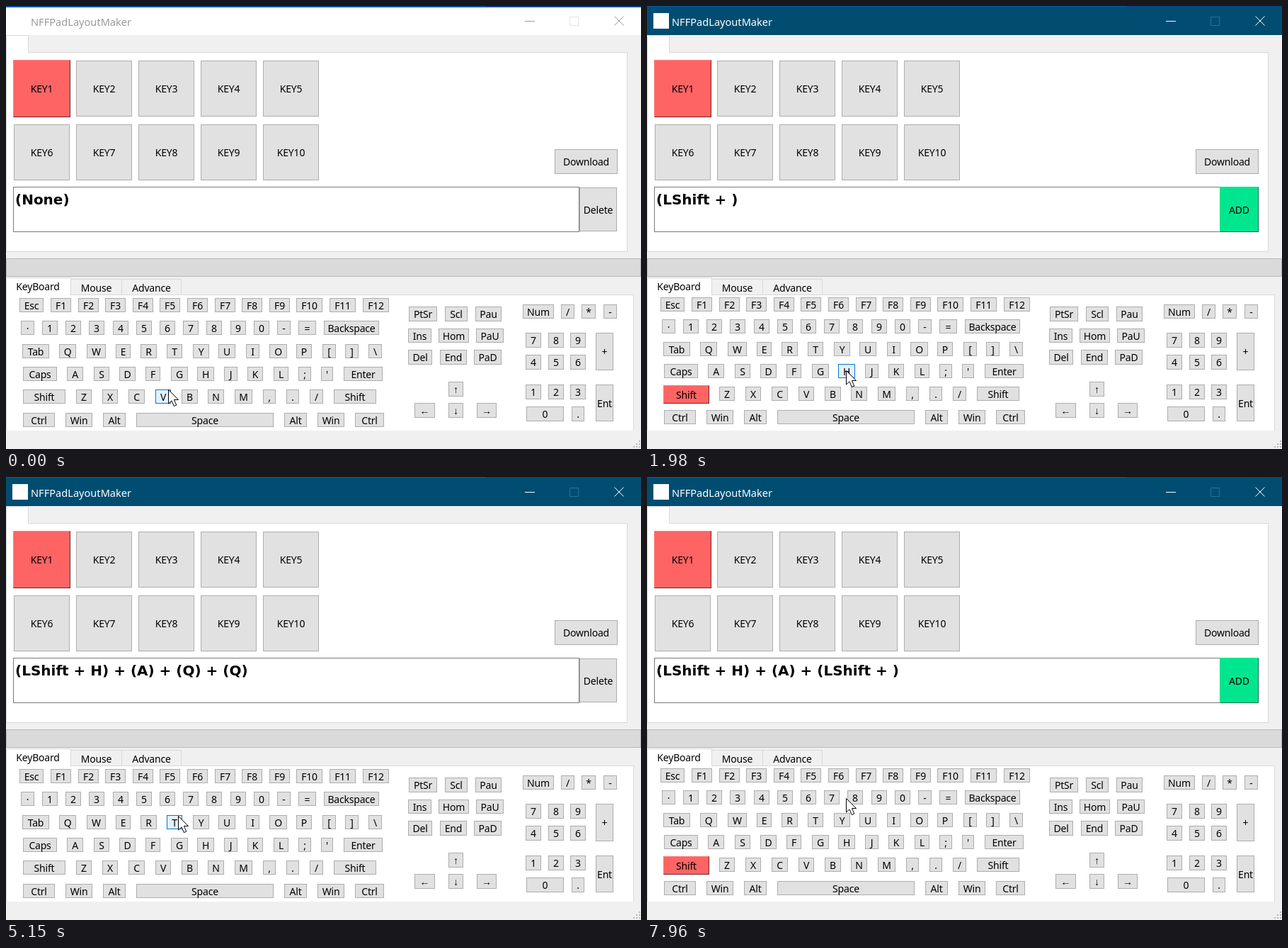
An HTML page for the animation above (8 s loop, 897 by 625 pixels).

```html
<!DOCTYPE html>
<html lang="en">
<head>
<meta charset="utf-8">
<title>NFFPadLayoutMaker</title>
<style>
html, body { margin: 0; width: 100%; height: 100%; overflow: hidden; background: #f0f0f0; }
#stage { position: absolute; left: 0; top: 0; width: 897px; height: 625px; overflow: hidden; background: #f0f0f0;
  font: 14px "Noto Sans", "Open Sans", sans-serif; letter-spacing: -.2px; color: #000; }
#stage div { position: absolute; box-sizing: border-box; white-space: pre; }
#stage svg { position: absolute; overflow: visible; }
#bar { left: 0; top: 1px; width: 897px; height: 40px; background: #fff; border-top: 1px solid #0b5ca5; color: #999; --off: #e2e2e2; }
#bar.active { background: #014d71; border-color: #014d71; color: #fff; --off: #2b7191; }
#name { left: 35px; top: 0; line-height: 40px; font-size: 14.6px; letter-spacing: 0; }
#bar svg { left: 0; top: -2px; fill: none; stroke: currentColor; }
.pane { background: #fff; border: 1px solid #d9d9d9; }
.tab { background: #f0f0f0; border: 1px solid #d9d9d9; border-bottom: 0; text-align: center; line-height: 23px; }
.tab.open { background: #fff; }
.key { display: flex; align-items: center; justify-content: center; background: #e1e1e1; border: 1px solid #adadad; }
.key.hover { background: #e5f1fb; border-color: #0078d7; }
.key.press { background: #cce4f7; border-color: #005499; }
.key.hot { background: #ff6464; border-color: #ff7c7c #702424 #702424 #ff7c7c; }
.key.add { background: #00e68f; border-color: #00e68f #00704a #00704a #00e68f; }
#combo { left: 10px; top: 255px; width: 800px; height: 64px; background: #fff; border: 1px solid #7a7a7a;
  font: bold 20px/34px "DejaVu Sans", sans-serif; letter-spacing: 0; padding-left: 2px; }
</style>
</head>
<body>
<div id="stage"></div>
<script>
const LOOP = 8000;
const stage = document.getElementById('stage');

function box(x, y, w, h, cls = '', text = '', parent = stage) {
  const el = document.createElement('div');
  el.className = cls;
  el.textContent = text;
  parent.append(el);
  place(el, x, y, w, h);
  return el;
}

function place(el, x, y, w, h) {
  Object.assign(el.style, { left: x + 'px', top: y + 'px', width: w + 'px', height: h + 'px' });
}

function fill(x, y, w, h, color) {
  box(x, y, w, h).style.background = color;
}

// Title bar
fill(0, 0, 678, 1, '#0b5ca5');
fill(678, 0, 219, 1, '#0a4387');
const bar = box(0, 1, 897, 40);
bar.id = 'bar';
bar.innerHTML = `<div id="name">NFFPadLayoutMaker</div>
  <svg width="897" height="41"><path d="M9 10h22v22h-22z" fill="#fff" stroke="none"/>
  <path d="M733 21.5h14M859.5 14.5l13 13m0-13l-13 13"/>
  <path d="M796.5 15.5h12v12h-12z" stroke="var(--off)"/></svg>`;

// Upper panel
box(0, 65, 878, 282, 'pane');
box(0, 41, 32, 25, 'tab open');
fill(1, 60, 30, 8, '#fff');
for (let i = 0; i < 10; i++) {
  const x = 11 + i % 5 * 88, y = i < 5 ? 77 : 167;
  if (i) box(x, y, 79, 79, 'key', 'KEY' + (i + 1));
  else box(x - 1, y - 1, 81, 81, 'key hot', 'KEY1');
}
const combo = box(10, 255, 800, 64);
combo.id = 'combo';
const splitter = box(0, 356, 897, 26);
splitter.style.cssText += 'background:#d9dad9;border:1px solid #b9b9b9';

// Lower panel
box(0, 407, 887, 192, 'pane').style.borderBottom = 0;
box(91, 385, 73, 23, 'tab', 'Mouse').style.borderBottom = '1px solid #d9d9d9';
box(163, 385, 85, 23, 'tab', 'Advance').style.borderBottom = '1px solid #d9d9d9';
box(0, 383, 92, 25, 'tab open', 'KeyBoard').style.paddingRight = '2px';

// Resize grip
for (let r = 0; r < 3; r++)
  for (let c = 0; c <= r; c++) fill(894 - c * 4, 613 + r * 4, 2, 2, '#b8b8b8');

// Buttons that react to the pointer
const keys = [];
function addKey(label, x, y, w, h) {
  const key = { label, x, y, w, h, el: box(x, y, w, h, 'key', label) };
  keys.push(key);
  return key;
}
addKey('Download', 775, 202, 89, 35);
const action = addKey('Delete', 810, 256, 53, 62);

// Main block: each row has a start, a gap, and "label width" pairs
const letters = [
  [19, 10, 'Esc 34 F1 28.6 F2 28.6 F3 28.6 F4 28.6 F5 28.6 F6 28.6 F7 28.6 F8 28.6 F9 28.6 F10 36.6 F11 36.6 F12 37'],
  [21, 11.2, '· 18.8 1 22 2 22 3 22 4 22 5 22 6 22 7 22 8 22 9 22 0 22 - 19 = 24.5 Backspace 78'],
  [23, 14.3, 'Tab 38 Q 24 W 27 E 21.3 R 22.5 T 22 Y 22.5 U 24 I 18.5 O 24.5 P 22 [ 18.5 ] 18.5 \\ 19'],
  [24, 14.3, 'Caps 48 A 23 S 22 D 23 F 21 G 23.5 H 23.5 J 19 K 22 L 21 ; 18 \' 17 Enter 55'],
  [24, 15, 'Shift 60 Z 22 X 22 C 22.5 V 22 B 22.5 N 23 M 25 , 18 . 18 / 19 Shift 60'],
  [24, 15, 'Ctrl 45 Win 38 Alt 32 Space 194 Alt 32 Win 38 Ctrl 41']
].map(([start, gap, spec]) => {
  const parts = spec.split(' '), row = [];
  for (let i = 0, x = start; i < parts.length; i += 2) {
    const w = +parts[i + 1];
    row.push(addKey(parts[i], Math.round(x), 0, Math.round(w), 20));
    x += w + gap;
  }
  return row;
});
const leftShift = letters[4][0];
const homeX = letters[4].map(k => k.x);

// Side blocks: "label x width" triples on one line
function line(y, h, spec) {
  const parts = spec.split(' ');
  for (let i = 0; i < parts.length; i += 3) addKey(parts[i], +parts[i + 1], y, +parts[i + 2], h);
}
line(424, 21, 'PtSr 569 40 Scl 620 32 Pau 663 37');
line(455, 20, 'Ins 568 33 Hom 611 43 PaU 664 39');
line(485, 21, 'Del 568 34 End 613 38 PaD 661 39');
line(530, 21, '↑ 625 21');
line(560, 21, '← 577 29 ↓ 625 21 → 665 28');
line(421, 20, 'Num 730 44 / 784 19 * 813 20 - 844 19');
line(461, 21, '7 734 22 8 766 22 9 797 22');
line(492, 21, '4 734 22 5 766 22 6 797 22');
line(534, 21, '1 734 22 2 766 22 3 797 22');
line(565, 21, '0 735 53 . 799 18');
line(461, 53, '+ 833 25');
line(534, 52, 'Ent 833 25');

// Pointer
stage.insertAdjacentHTML('beforeend', `<svg id="pointer" width="18" height="26" style="left:0;top:0">
  <path d="M.5 .5V20L5 15.9 8.3 23.6 11.8 22.1 8.5 14.5H14.6Z" fill="#fff" stroke="#000"/></svg>`);
const pointer = document.getElementById('pointer');

// Screen updates: first time, last time, count
const ticks = [0];
for (const [from, to, n] of [[70, 810, 8], [940, 1740, 8], [1860, 2580, 7], [2690, 3390, 7], [3500, 4210, 7],
  [4340, 5030, 7], [5150, 5840, 7], [5970, 6550, 6], [6690, 6690, 1], [6830, 6830, 1], [6890, 7580, 7], [7710, 7960, 3]])
  for (let i = 0; i < n; i++) ticks.push(Math.floor(from + (to - from) * i / Math.max(1, n - 1) / 10 + .01) && Math.round((from + (to - from) * i / Math.max(1, n - 1)) / 10) * 10);

// Pointer path: time, x, y
const path = [
  [0, 229, 541], [70, 222, 541], [600, 76, 541], [810, 68, 541], [940, 74, 540],
  [1740, 268, 514], [1860, 278, 513], [1980, 281, 514], [2100, 281, 514], [2580, 104, 514],
  [2690, 100, 514], [2920, 100, 514], [3160, 170, 494], [3390, 223, 490], [3700, 270, 488],
  [3960, 190, 535], [4210, 97, 502], [4340, 63, 503], [4450, 86, 491], [4800, 88, 488],
  [5030, 107, 484], [5150, 243, 478], [5380, 590, 368], [5610, 815, 294], [5840, 840, 288],
  [6550, 840, 288], [6690, 824, 284], [6830, 690, 316], [6890, 545, 355], [7120, 250, 480],
  [7350, 60, 548], [7470, 30, 555], [7580, 21, 553], [7710, 35, 551], [7840, 150, 512], [7960, 281, 453]
];

const typed = [
  [0, '(None)'], [700, '(LShift + )'], [2100, '(LShift + H)'], [2800, '(LShift + H) + (A)'],
  [4560, '(LShift + H) + (A) + (Q)'], [4800, '(LShift + H) + (A) + (Q) + (Q)'],
  [6080, '(LShift + H) + (A) + (Q)'], [6430, '(LShift + H) + (A)'], [7710, '(LShift + H) + (A) + (LShift + )']
];
const presses = [2690, 4450, 4680, 5970, 6310];

const lastAt = (list, t) => list.findLast(item => item[0] <= t);

function pointAt(t) {
  const i = path.findLastIndex(p => p[0] <= t);
  const a = path[i], b = path[i + 1] || a;
  const f = b === a ? 0 : (t - a[0]) / (b[0] - a[0]);
  return [a[1] + (b[1] - a[1]) * f, a[2] + (b[2] - a[2]) * f].map(Math.round);
}

function layOut(held) {
  letters.forEach((row, r) => row.forEach((key, i) => {
    key.y = held ? Math.floor(411 + 31.6 * r) + (r === 5) : Math.round(412 + 32.3 * r);
    if (r === 4 && i) key.x = homeX[i] + (held ? 3 : 0);
    place(key.el, key.x, key.y, key.w, key.h);
  }));
  if (held) place(leftShift.el, 23, 535, 65, 26);
  if (held) place(action.el, 809, 255, 55, 64);
  else place(action.el, action.x, action.y, action.w, action.h);
  action.el.textContent = held ? 'ADD' : 'Delete';
}

function show(t) {
  const [x, y] = pointAt(t);
  const text = lastAt(typed, t)[1];
  const held = text.endsWith('+ )');
  bar.className = t >= 700 ? 'active' : '';
  combo.textContent = text;
  layOut(held);
  const lagging = t >= 6830 && t <= 6890;
  const pressed = presses.some(p => t >= p && t < p + 60);
  for (const key of keys) {
    const over = lagging ? key === action
      : x >= key.x && x < key.x + key.w && y >= key.y && y < key.y + key.h;
    let state = over ? (pressed ? ' press' : ' hover') : '';
    if (held && key === leftShift) state = ' hot';
    if (held && key === action) state = ' add';
    key.el.className = 'key' + state;
  }
  pointer.style.transform = `translate(${x}px, ${y}px)`;
}

let shown = -1;
function frame() {
  const now = performance.now() % LOOP;
  const tick = ticks.findLast(t => t <= now);
  if (tick !== shown) show(shown = tick);
  requestAnimationFrame(frame);
}
frame();
</script>
</body>
</html>
```
